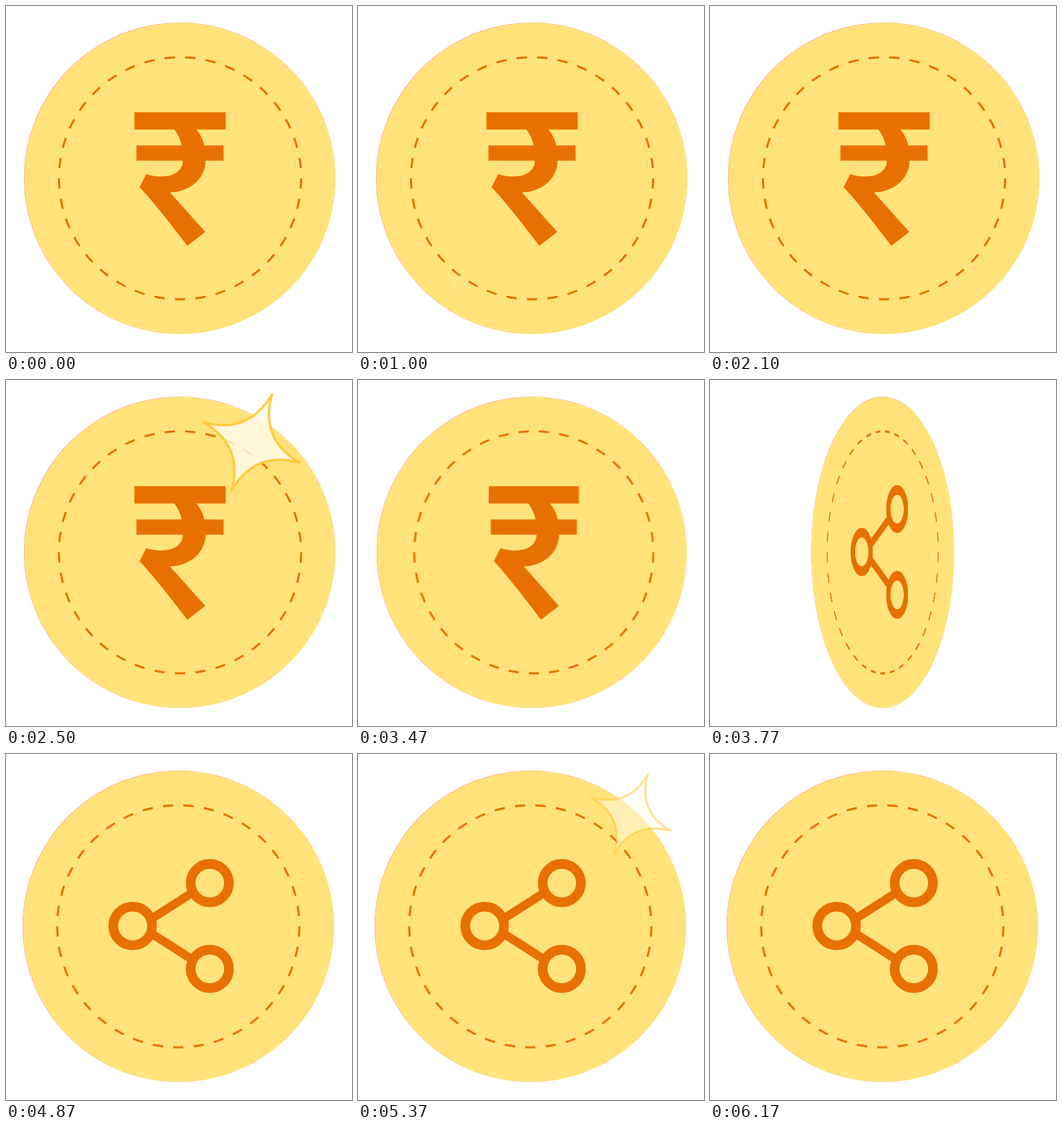
Animation of 500 by 500 pixels, one loop 8000 ms. Source, as an HTML page:

```html
<!DOCTYPE html>
<html lang="en">
<head>
<meta charset="utf-8">
<title>Coin flip</title>
<style>
  html, body { margin: 0; width: 100%; height: 100%; overflow: hidden; background: #fff; }
  svg { position: absolute; inset: 0; width: 100%; height: 100%; }

  .side { backface-visibility: hidden; }
  .front { animation: turn-front 8s linear infinite; }
  .back { animation: turn-back 8s linear infinite; }
  .edge { fill: #ffad94; }
  .gold { fill: #ffe37a; }
  .ink { fill: #e87000; }
  .line { fill: none; stroke: #e87000; }
  .dashes { stroke-width: 3; stroke-dasharray: .5 .5; }

  .front .disc { transform-origin: 251px 249px; animation: swell 8s step-end infinite; }
  .front .face { animation: lean 8s step-end infinite; }

  @keyframes turn-front {
    0%, 43.374% { transform: rotateY(0deg); }
    43.375% { transform: rotateY(9.25deg); animation-timing-function: steps(9); }
    47.125% { transform: rotateY(117.3deg); animation-timing-function: steps(6); }
    49.625%, 100% { transform: rotateY(180deg); }
  }
  @keyframes turn-back {
    0%, 43.374% { transform: rotateY(-180deg); }
    43.375% { transform: rotateY(-170.75deg); animation-timing-function: steps(9); }
    47.125% { transform: rotateY(-62.7deg); animation-timing-function: steps(6); }
    49.625%, 100% { transform: rotateY(0deg); }
  }
  /* the rim shows a little thickness while the front turns away */
  @keyframes swell {
    0% { transform: none; }
    43.375% { transform: scaleX(1.009); }
    50%, 100% { transform: none; }
  }
  @keyframes lean {
    0% { transform: none; }
    43.375% { transform: translateX(2.6px); }
    50%, 100% { transform: none; }
  }

  .star {
    fill: #fffaea; fill-opacity: .83;
    stroke: #ffc83a; stroke-width: 3.8; stroke-linejoin: round;
    animation: pop 8s linear infinite, fade 8s linear infinite;
    animation-delay: calc(var(--at) - 8s);
  }
  .star.linger { animation-name: pop, linger; }
  @keyframes pop {
    0% { transform: rotate(22.8deg) scale(0); }
    3.75% { transform: rotate(22.8deg) scale(1); }
    9.4%, 100% { transform: rotate(22.8deg) scale(.33); }
  }
  @keyframes fade {
    0%, 5% { opacity: 1; }
    8% { opacity: .08; }
    9.6%, 100% { opacity: 0; }
  }
  @keyframes linger {
    0%, 5% { opacity: 1; }
    8% { opacity: .12; }
    9.6%, 23.374% { opacity: .1; }
    23.375%, 100% { opacity: 0; }
  }
</style>
</head>
<body>
<svg class="side back" viewBox="0 0 500 500">
  <circle class="edge" cx="248.8" cy="248.9" r="224.9"/>
  <circle class="gold" cx="249.4" cy="249.2" r="224.6"/>
  <circle class="line dashes" cx="249" cy="249" r="175" pathLength="37"/>
  <g class="line" stroke-width="14">
    <circle cx="183" cy="248.5" r="28"/>
    <circle cx="294.5" cy="186.5" r="27.7"/>
    <circle cx="294.5" cy="310.5" r="27.7"/>
    <path stroke-width="12.5" d="M208 239.5L270 200M208 258L270 297.5"/>
  </g>
</svg>

<svg class="side front" viewBox="0 0 500 500">
  <g class="disc">
    <circle class="edge" cx="250.8" cy="248.9" r="224.9"/>
    <circle class="gold" cx="251.4" cy="249.2" r="224.6"/>
  </g>
  <g class="face">
    <circle class="line dashes" cx="251.5" cy="249" r="175" pathLength="37"/>
    <path class="ink" d="M185.5 153.5H317.5V178.5H185.5ZM188.5 201.5H314.5V223.5H188.5Z"/>
    <path class="ink" d="M243 178H275Q284 189 286.5 202L288.5 223C288 250 266 268 237 269.5
      L288 326.5L262 346.5Q212 281 193 262L202.5 243C228 251 256 245 255.5 223L254 202Q252 190 243 178Z"/>
  </g>
</svg>

<svg viewBox="0 0 500 500">
  <defs>
    <path id="spark" d="M0-89Q10-10 89 0Q10 10 0 89Q-10 10-89 0Q-10-10 0-89Z"/>
  </defs>
  <g transform="translate(145 398)"><use class="star linger" href="#spark" style="--at:.23s"/></g>
  <g transform="translate(355 90.3)"><use class="star" href="#spark" style="--at:2.1s"/></g>
  <g transform="translate(394.5 87)"><use class="star" href="#spark" style="--at:4.87s"/></g>
</svg>
</body>
</html>
```
